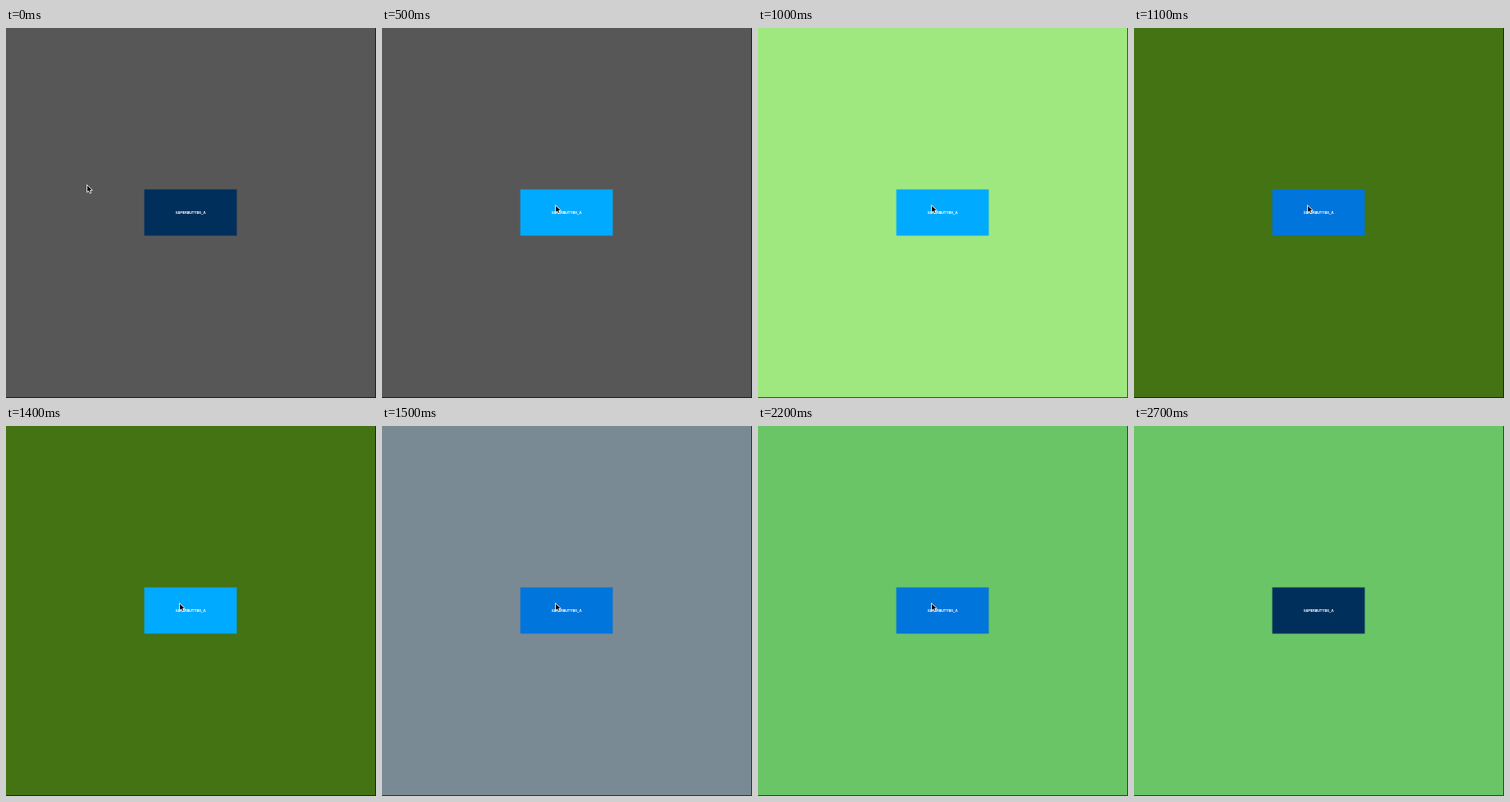
Animation, 400 px wide and 400 px high, one loop 3.3 s. Source, as an HTML page with a canvas:

```html
<!DOCTYPE html>
<html lang="en">
<head>
<meta charset="utf-8">
<title>Colour button</title>
<style>
  html, body { margin: 0; width: 100%; height: 100%; overflow: hidden; background: #575757; }
  canvas { display: block; width: 400px; height: 400px; }
</style>
</head>
<body>
<canvas id="stage" width="400" height="400"></canvas>
<script>
const ctx = document.getElementById('stage').getContext('2d');
const LOOP = 3300, STEP = 100, SIZE = 400;
const BUTTON = { x: 149.5, y: 174.5, w: 100, h: 50 };
const BUTTON_COLORS = { normal: '#002f5c', hover: '#0075dc', pressed: '#00aaff' };

// Each press lasts one step; its release picks the next background.
const clicks = [
  { press: 500, color: '#9fe880' },
  { press: 1000, color: '#437312' },
  { press: 1400, color: '#7a8a94' },
  { press: 1700, color: '#886090' },
  { press: 2100, color: '#6ac566' }
];
const START = [87, 169], TARGET = [187, 191], EXIT = [27, 13];
const GONE = 2700;

const clamp01 = v => Math.min(1, Math.max(0, v));
const mix = (a, b, p) => a.map((v, i) => Math.round(v + (b[i] - v) * p));

function cursorAt(t) {
  if (t >= GONE) return null;
  return t <= 2200
    ? mix(START, TARGET, clamp01(t / 300))
    : mix(TARGET, EXIT, clamp01((t - 2200) / 400));
}

function backgroundAt(t) {
  return clicks.reduce((color, c) => t >= c.press + STEP ? c.color : color, '#575757');
}

function buttonState(t, cursor) {
  if (clicks.some(c => c.press === t)) return 'pressed';
  if (!cursor) return 'normal';
  const [x, y] = cursor, b = BUTTON;
  const inside = x >= b.x && x < b.x + b.w && y >= b.y && y < b.y + b.h;
  return inside ? 'hover' : 'normal';
}

function drawCursor([x, y]) {
  const arrow = [[0, 0], [0, 8.2], [1.9, 6.5], [3.2, 9.3], [4.7, 8.6], [3.5, 6], [6, 5.8]];
  ctx.beginPath();
  arrow.forEach(([dx, dy]) => ctx.lineTo(x + 0.5 + dx, y + 0.5 + dy));
  ctx.closePath();
  ctx.lineWidth = 0.8;
  ctx.strokeStyle = '#fff';
  ctx.fillStyle = '#000';
  ctx.fill();
  ctx.stroke();
}

function draw(time) {
  const t = Math.floor((time % LOOP) / STEP) * STEP;
  const cursor = cursorAt(t);

  ctx.fillStyle = backgroundAt(t);
  ctx.fillRect(0, 0, SIZE, SIZE);
  ctx.fillStyle = 'rgba(0, 0, 0, 0.6)';
  ctx.fillRect(SIZE - 1, 0, 1, SIZE);
  ctx.fillRect(0, SIZE - 1, SIZE - 1, 1);

  ctx.fillStyle = BUTTON_COLORS[buttonState(t, cursor)];
  ctx.fillRect(BUTTON.x, BUTTON.y, BUTTON.w, BUTTON.h);

  ctx.fillStyle = '#fff';
  ctx.font = 'bold 4.15px "DejaVu Sans Mono", monospace';
  ctx.textAlign = 'center';
  ctx.fillText('SUPERBUTTON_A', 199.5, 201.3);

  if (cursor) drawCursor(cursor);
}

const origin = performance.now();
function tick() {
  draw(performance.now() - origin);
  requestAnimationFrame(tick);
}
tick();
</script>
</body>
</html>
```
